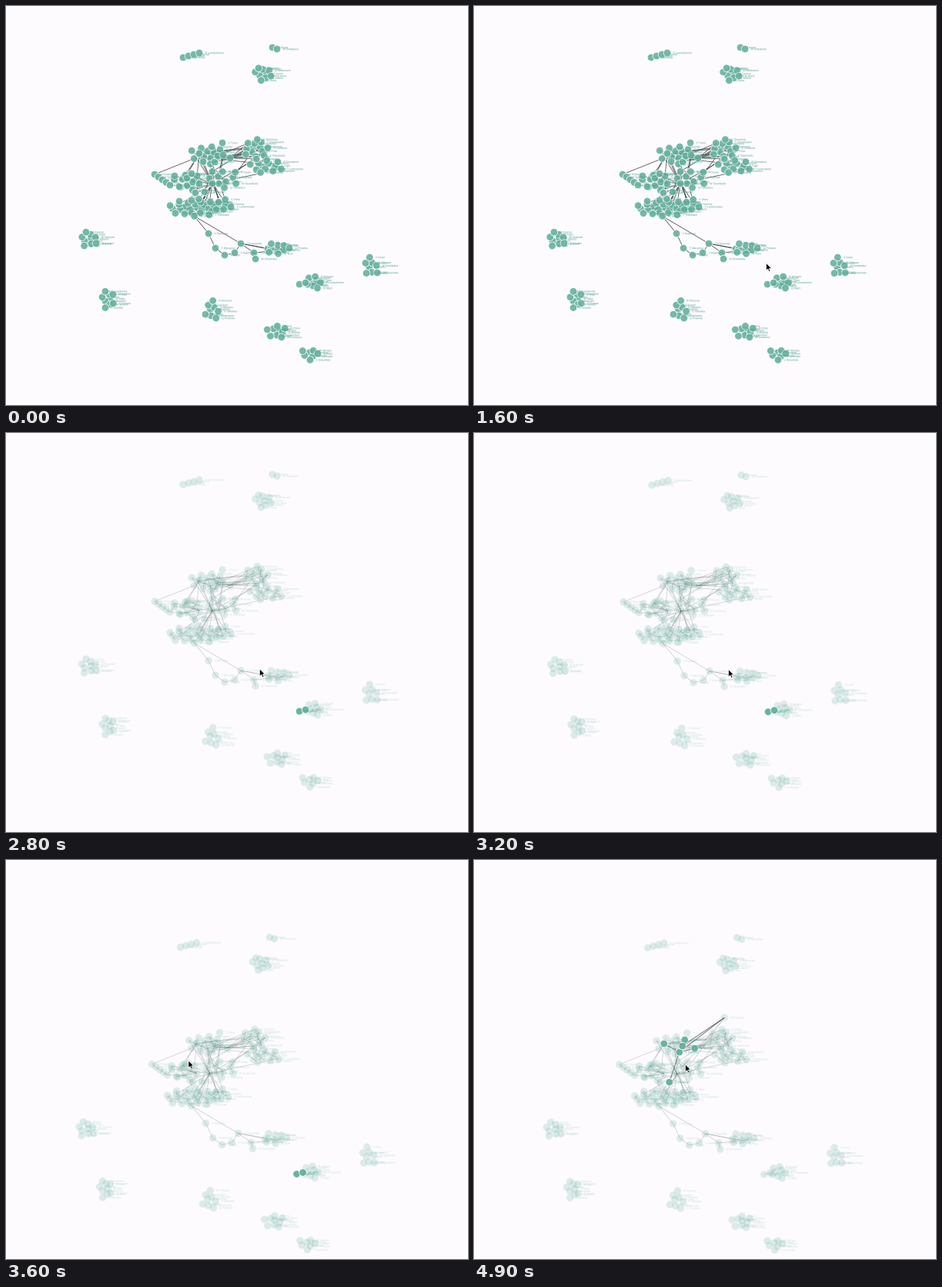
These frames come from a looping animation (600x519 px, 5000 ms). A matplotlib script:

```python
import random

import matplotlib.pyplot as plt
import numpy as np
from matplotlib.animation import FuncAnimation
from matplotlib.collections import LineCollection, PathCollection
from matplotlib.colors import to_rgba
from matplotlib.patches import Polygon
from matplotlib.textpath import TextPath
from matplotlib.transforms import IdentityTransform

W, H, DPI = 600, 519, 64
PX = 72 / DPI
STEP, FRAMES = 100, 50
TEAL, TEXT, INK, BG = "#69b3a2", "#58a592", "#333333", "#fdfbfe"
GOLDEN = np.pi * (3 - 5 ** 0.5)

plt.rcParams["font.family"] = "Liberation Sans"
rng = random.Random(4)
nodes, links = [], set()


def add(*pts):
    """Append nodes and return their indices."""
    nodes.extend(pts)
    return list(range(len(nodes) - len(pts), len(nodes)))


def blob(cx, cy, rx, ry, n):
    """Sunflower packing in an ellipse with a little jitter."""
    pts = []
    for k in range(n):
        r, a = ((k + 0.5) / n) ** 0.5, k * GOLDEN + cx
        pts.append((cx + rx * r * np.cos(a) + rng.uniform(-1, 1),
                    cy + ry * r * np.sin(a) + rng.uniform(-1, 1)))
    return add(*pts)


def row(start, end, n):
    return add(*zip(np.linspace(start[0], end[0], n),
                    np.linspace(start[1], end[1], n)))


def fan(hub, ids):
    for i in ids:
        if i != hub:
            links.add((hub, i))


def chain(ids):
    links.update(zip(ids, ids[1:]))


def dist(a, b):
    return np.hypot(nodes[a][0] - nodes[b][0], nodes[a][1] - nodes[b][1])


# main component, hub first in each star
right = blob(324, 185, 18, 13, 13) + blob(336, 208, 24, 11, 13)
upper = blob(260, 194, 21, 13, 12)
far = add((281, 178))
arm = row((193, 219), (213, 233), 5)
left = blob(234, 229, 17, 15, 8)
mid = blob(284, 225, 24, 13, 10)
low = blob(245, 262, 35, 13, 27) + blob(282, 260, 13, 8, 6)
core = add((268, 231))[0]
left_star = add((251, 231), (219, 221), (233, 220), (235, 224), (241, 218),
                (225, 235), (246, 243))
top_star = add((271, 203), (251, 192), (278, 187), (275, 195), (291, 198),
               (258, 242))
held = add((282, 194))[0]
main = [i for i in range(len(nodes)) if i not in far + [held]]

for i in main[1:]:
    links.add((min(main[:main.index(i)], key=lambda k: dist(k, i)), i))
fan(core, rng.sample(low, 7) + rng.sample(mid, 3) + rng.sample(upper, 2)
    + rng.sample(left, 3) + rng.sample(right, 2))
fan(top_star[4], rng.sample(right[:13], 7) + rng.sample(upper, 3))
fan(top_star[1], rng.sample(left, 3) + rng.sample(right[:13], 2))
for i in rng.sample(right, 6):
    fan(i, rng.sample(mid + upper, 1) + rng.sample(right, 1))
for i in rng.sample(upper, 4):
    fan(i, rng.sample(low + left, 1))
fan(left_star[0], left_star)
fan(top_star[0], top_star)
fan(held, [top_star[0], top_star[3]] + rng.sample(mid, 2))

# tail
tail = add((263, 296), (272, 315), (284, 324), (297, 321), (305, 309))
fork = add((322, 321), (324, 329), (340, 316))
tip = blob(354, 315, 15, 8, 9)
bottom = max(low, key=lambda k: nodes[k][1])
chain([bottom] + tail + [bottom])
fan(tail[-1], [fork[0], fork[2], tip[0]])
chain([fork[1], fork[0], tip[2], tip[0], fork[2]])

# separate islands
row((230, 67), (251, 61), 4)
row((346, 54), (352, 56), 2)
for island in [(333, 88, 12, 10, 9), (107, 303, 13, 11, 9),
               (132, 381, 9, 13, 9), (267, 395, 11, 13, 8),
               (351, 424, 13, 10, 9), (394, 453, 12, 9, 7),
               (399, 359, 12, 9, 8), (474, 339, 11, 13, 8)]:
    blob(*island)
pair = add((381, 362), (389, 360))
chain(pair)

base = np.array(nodes, float)
ends = np.array(sorted(links))
count = len(base)


def label():
    syl = ["ra", "no", "vel", "tu", "mi", "so", "lem", "ka", "do", "pri"]
    word = "".join(rng.choice(syl) for _ in range(rng.randint(2, 4)))
    return rng.choice("QRTVW") + " " + word.capitalize()


# cursor: time in ms, x, y
path = np.array([(900, 212, 88), (1000, 339, 382), (1500, 339, 382),
                 (1600, 379.5, 334.5), (1800, 388, 360), (1900, 388, 360),
                 (2100, 353, 278), (2600, 329.5, 307), (3500, 329.5, 307),
                 (3600, 237, 261), (4000, 247, 277), (4200, 247, 277),
                 (4400, 275.5, 237.5), (4500, 278, 240), (4700, 325, 205),
                 (4900, 274.5, 266)])


def pan(t):
    keys = [3100, 3200, 3300, 3400, 3500]
    return np.array([np.interp(t, keys, [0, 1, 0.5, -20, -3.5]),
                     np.interp(t, keys, [0, 0.7, 3, 26, 46.5])])


def layout(t):
    """Node positions after panning, settling and dragging."""
    pos = base + pan(t)
    pos += np.array([-0.8, 0.5]) * np.interp(t, [4500, 4900], [0, 1])
    pos[held] += np.array([47.5, -36]) * np.interp(t, [4500, 4700], [0, 1])
    return pos


def lit_nodes(t):
    if t < 1800:
        return []
    if t < 4100:
        return pair
    if t < 4500:
        return left_star
    return top_star + [held] if t < 4800 else top_star


def tint(color, alpha):
    out = np.tile(to_rgba(color), (len(alpha), 1))
    out[:, 3] = alpha
    return out


fig = plt.figure(figsize=(W / DPI, H / DPI), dpi=DPI, facecolor=BG)
ax = fig.add_axes([0, 0, 1, 1])
ax.set_xlim(0, W)
ax.set_ylim(H, 0)
ax.axis("off")

lines = LineCollection([], linewidths=0.8 * PX, zorder=1)
ax.add_collection(lines, autolim=False)
dots = ax.scatter(*base.T, s=(9.6 * PX) ** 2, linewidths=0.8 * PX, zorder=2)
words = PathCollection([TextPath((0, 0), label(), size=3.6) for _ in nodes],
                       offsets=base, offset_transform=ax.transData,
                       linewidths=0, zorder=3)
words.set_transform(IdentityTransform())
ax.add_collection(words, autolim=False)

arrow = np.array([(0, 0), (0, 9.5), (2.2, 7.4), (3.7, 10.8), (5.2, 10.1),
                  (3.8, 6.9), (6.7, 6.7)])
cursor = Polygon(arrow, fc="black", ec="white", lw=0.6 * PX, zorder=4)
ax.add_patch(cursor)


def draw(i):
    t = i * STEP
    pos = layout(t)
    fade = np.interp(t, [1700, 1900, 2100, 2500], [0, 0.8, 0.92, 1])
    on = np.zeros(count, bool)
    on[lit_nodes(t)] = True
    hot = on.copy()
    hot[held] |= t >= 4500
    hot = hot[ends].all(axis=1)

    lines.set_segments(pos[ends])
    lines.set_color(tint(INK, np.where(hot, 0.8, 0.85 - 0.63 * fade)))

    alpha = np.where(on, 1, 0.92 - 0.7 * fade)
    dots.set_offsets(pos)
    dots.set_facecolor(tint(TEAL, alpha))
    dots.set_edgecolor(tint("white", alpha))

    words.set_offsets(pos + [7.5, 1.2])
    words.set_facecolor(tint(TEXT, np.where(on, 1, 1 - 0.7 * fade)))

    spot = [np.interp(t, path[:, 0], path[:, k]) for k in (1, 2)]
    cursor.set_xy(arrow + spot + (pan(t) if t < 3600 else 0))
    cursor.set_visible(t >= 900)
    return lines, dots, words, cursor


anim = FuncAnimation(fig, draw, frames=FRAMES, interval=STEP, repeat=True)
plt.show()
```
